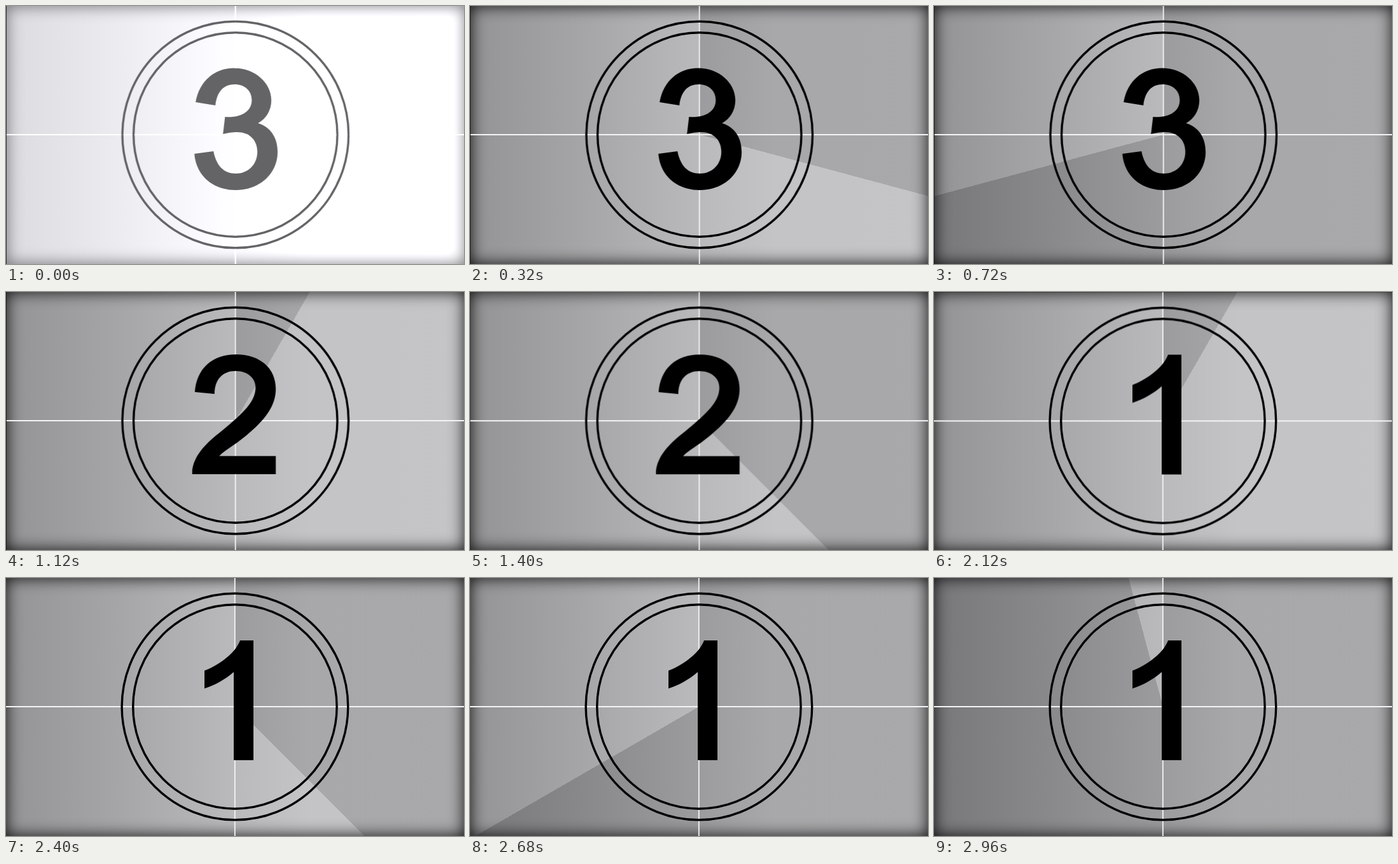
An HTML page that plays this animation: 720 px wide and 405 px high, repeating every 3000 ms.

```html
<!DOCTYPE html>
<html lang="en">
<head>
<meta charset="utf-8">
<title>Film leader countdown</title>
<style>
  @property --sweep {
    syntax: "<angle>";
    inherits: false;
    initial-value: 360deg;
  }
  html, body {
    margin: 0;
    width: 100%;
    height: 100%;
    overflow: hidden;
    background: #111;
  }
  .stage {
    position: relative;
    width: 720px;
    height: 405px;
    overflow: hidden;
    animation: weave 3s linear -4ms infinite;
  }
  .stage > * {
    position: absolute;
    inset: 0;
  }
  .dark {
    background: linear-gradient(90deg, #78777a, #89888b 25%, #9c9b9d 50%, #a8a7a9 66%, #a9a8aa);
  }
  .light {
    background: linear-gradient(90deg, #949395, #a6a5a7 25%, #bab9bb 50%, #c4c3c5 66%, #c5c4c6);
    -webkit-mask: conic-gradient(at 360px 202px, transparent var(--sweep), #000 0);
    mask: conic-gradient(at 360px 202px, transparent var(--sweep), #000 0);
    animation: sweep 1s -4ms infinite;
  }
  .vignette {
    box-shadow: inset 0 0 25px rgba(0, 0, 0, .9);
  }
  .flash {
    background: #646466;
    mix-blend-mode: plus-lighter;
    animation: flash 1s step-end -4ms infinite;
  }
  .cross { stroke: #f4f4f5; stroke-width: 1.8; }
  .ring { fill: none; stroke: #000; stroke-width: 3.4; }
  .digit { visibility: hidden; animation: show 3s step-end infinite; }
  .three { animation-delay: -4ms; }
  .two { animation-delay: -2004ms; }
  .one { animation-delay: -1004ms; }

  /* One full frame of 40 ms, then a turn in 24 steps of 15 degrees */
  @keyframes sweep {
    0% { --sweep: 360deg; animation-timing-function: step-end; }
    4% { --sweep: 0deg; animation-timing-function: steps(24, end); }
    100% { --sweep: 360deg; }
  }
  @keyframes flash {
    0% { opacity: 1; }
    4%, 100% { opacity: 0; }
  }
  @keyframes show {
    0% { visibility: visible; }
    33.3333%, 100% { visibility: hidden; }
  }
  /* Slight gate weave */
  @keyframes weave {
    0%, 40% { transform: translate(.8px, 0); }
    57%, 71% { transform: translate(-.1px, .4px); }
    79%, 99% { transform: none; }
    100% { transform: translate(.8px, 0); }
  }
</style>
</head>
<body>
<div class="stage">
  <div class="dark"></div>
  <div class="light"></div>
  <div class="vignette"></div>
  <svg width="720" height="405" viewBox="0 0 720 405" role="img" aria-label="Countdown 3, 2, 1">
    <path class="cross" d="M0 202H720M359.8 0V405"/>
    <circle class="ring" cx="359.9" cy="202" r="177.8"/>
    <circle class="ring" cx="359.9" cy="202" r="160.2"/>
    <path class="digit three" d="M297.3 151C303 118 327 97.5 357.5 97.5C391 97.5 416.3 121 416.3 148
      C416.3 164 408 177 395.5 184C415.5 190 426.2 207 426.2 229C426.2 263 398 289 360.5 289
      C324 289 298 266 295.3 232L325.3 228C330 251 341.5 263 360.5 263C380.5 263 394.3 248 394.3 229
      C394.3 210 381.5 198 362.5 198C355.5 198 348 199 340.3 201L343.5 174
      C367.5 176 385.5 166 385.5 148C385.5 133 374.5 123 358.5 123C341.5 123 331 134 328.3 156Z"/>
    <path class="digit two" d="M423.3 257.5V286H292C291 276 295 266 300 257C310 241 322 231 342 215
      C372 190 391.5 172 391.5 150C391.5 135 379 124 360 124C340 124 327 137 327 160L296 157
      C299 120 323 98 361 98C399 98 423.3 120 423.3 152C423.3 180 405 202 376 226
      C355 243 341 250 334.5 257.5Z"/>
    <path class="digit one" d="M389 286H358V147.5C345 159 329 168 312 173.5V145.5
      C321 142 333 136 345 126.5C357 117 364 108 368 98H389Z"/>
  </svg>
  <div class="flash"></div>
</div>
</body>
</html>
```
